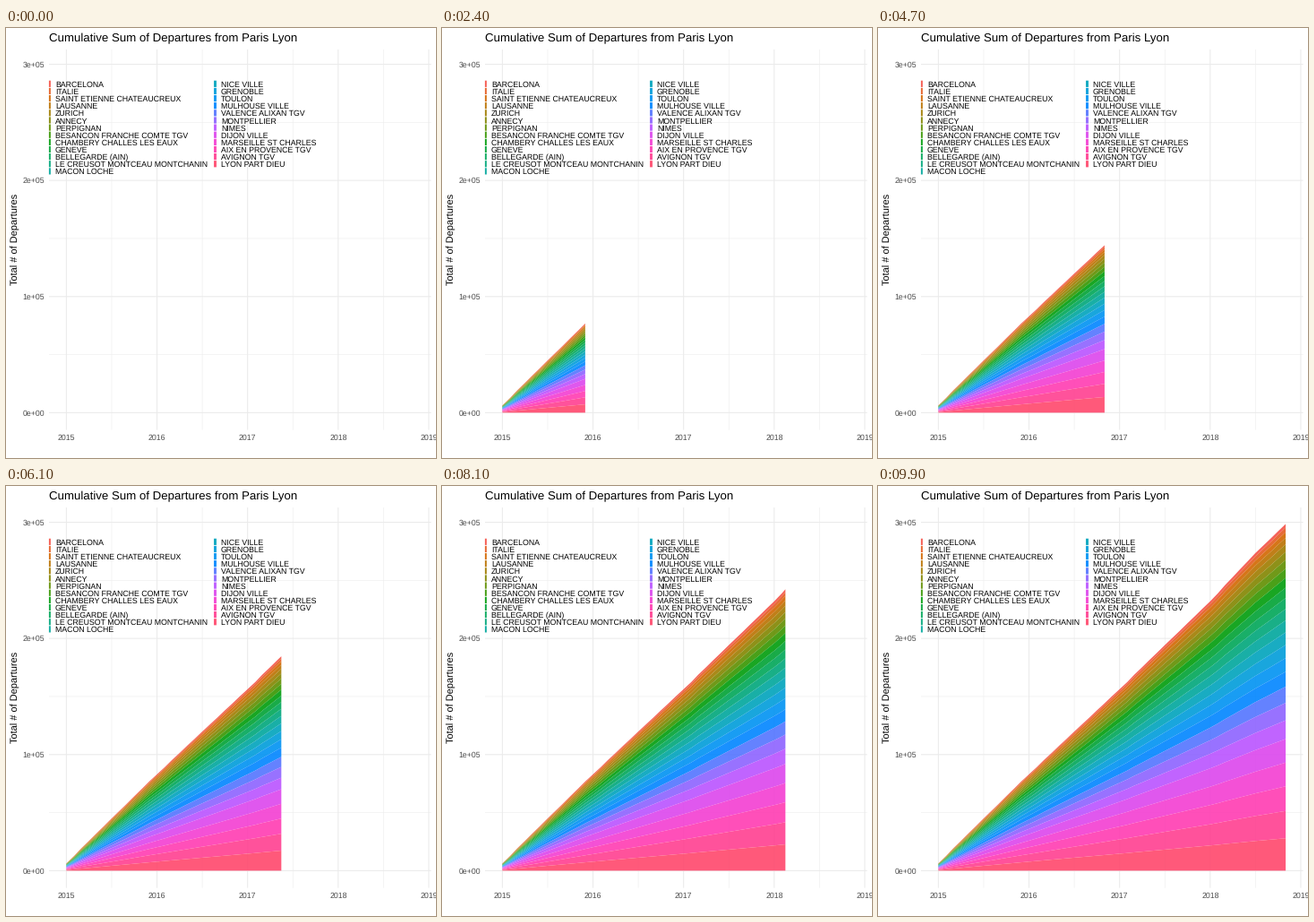
A matplotlib script for the animation above (10 s loop, 480 by 480 pixels).

```python
import matplotlib.pyplot as plt
import numpy as np
from matplotlib.animation import FuncAnimation
from matplotlib.patches import Polygon, Rectangle

plt.rcParams["font.family"] = "Liberation Sans"
plt.rcParams["text.hinting"] = "none"

SIZE, DPI, FRAMES = 480, 100, 100
LEFT, RIGHT, TOP, BOTTOM = 48, 474.5, 24, 448.6
X0, PX_PER_DAY = 67.4, 0.2769
Y0, PX_PER_K = 429.4, 1.2963
ALPHA = 0.9
ROW = 8.13

STATIONS = [
    "BARCELONA", "ITALIE", "SAINT ETIENNE CHATEAUCREUX", "LAUSANNE", "ZURICH",
    "ANNECY", "PERPIGNAN", "BESANCON FRANCHE COMTE TGV",
    "CHAMBERY CHALLES LES EAUX", "GENEVE", "BELLEGARDE (AIN)",
    "LE CREUSOT MONTCEAU MONTCHANIN", "MACON LOCHE", "NICE VILLE", "GRENOBLE",
    "TOULON", "MULHOUSE VILLE", "VALENCE ALIXAN TGV", "MONTPELLIER", "NIMES",
    "DIJON VILLE", "MARSEILLE ST CHARLES", "AIX EN PROVENCE TGV",
    "AVIGNON TGV", "LYON PART DIEU",
]
COUNT = len(STATIONS)


def hcl(hue, chroma=100, lum=65, contrast=1.5):
    """Polar LUV colour to clipped sRGB, deepened by a power curve."""
    h = np.radians(hue)
    u = chroma * np.cos(h) / (13 * lum) + 0.1978
    v = chroma * np.sin(h) / (13 * lum) + 0.4683
    y = ((lum + 16) / 116) ** 3
    xyz = np.array([y * 9 * u / (4 * v), y, y * (12 - 3 * u - 20 * v) / (4 * v)])
    to_rgb = np.array([[3.2406, -1.5372, -0.4986],
                       [-0.9689, 1.8758, 0.0415],
                       [0.0557, -0.2040, 1.0570]])
    lin = np.clip(to_rgb @ xyz, 0, 1)
    rgb = np.where(lin <= 0.0031308, 12.92 * lin,
                   1.055 * lin ** (1 / 2.4) - 0.055)
    return np.clip(rgb, 0, 1) ** contrast


rank = np.arange(COUNT)
colors = [hcl(15 + 360 * k / COUNT) for k in rank]

# Slow growth for the small stations, a jump and a cubic rise for the top five
weights = np.where(rank < 20,
                   np.interp(rank, [0, 4, 15, 19], [4, 8.4, 15.2, 20.8]),
                   26.2 + 9.8 * ((rank - 20) / 4) ** 3)
# Share of the total lying below each band edge, top edge first
shares = np.append(np.cumsum(weights[::-1])[::-1], 0) / weights.sum()

months = np.arange("2015-01", "2018-12", dtype="datetime64[M]")
days = (months.astype("datetime64[D]") - np.datetime64("2015-01-01")).astype(int)
key_frames = np.round(days / days[-1] * (FRAMES - 1))
# Cumulative total in thousands, nearly steady growth
totals = np.interp(np.arange(len(months)), [0, 11, 25, 36, 42, 46],
                   [6.2, 76.8, 162.5, 232, 273.3, 298.5])

fig = plt.figure(figsize=(SIZE / DPI, SIZE / DPI), dpi=DPI, facecolor="white")
ax = fig.add_axes([0, 0, 1, 1])
ax.set_xlim(0, SIZE)
ax.set_ylim(SIZE, 0)
ax.axis("off")


def pt(px):
    return px * 72 / DPI


def label(x, y, s, px=8.8, color="black", **kw):
    ax.text(x, y, s, fontsize=pt(px), color=color, va="baseline", zorder=5, **kw)


def grid(xs, ys, px):
    style = dict(color="#EBEBEB", lw=pt(px), zorder=1, snap=False,
                 solid_capstyle="butt")
    for x in xs:
        ax.plot([x, x], [TOP, BOTTOM], **style)
    for y in ys:
        ax.plot([LEFT, RIGHT], [y, y], **style)


def year_x(year):
    return X0 + (year - 2015) * 365.25 * PX_PER_DAY


def value_y(k):
    return Y0 - k * PX_PER_K


grid(year_x(np.arange(2015.5, 2019)), value_y(np.arange(50, 300, 100)), 0.53)
grid(year_x(np.arange(2015, 2020)), value_y(np.arange(0, 400, 100)), 1.07)

for year in range(2015, 2020):
    label(year_x(year), 460.2, str(year), color="#4D4D4D", ha="center")
for n in range(4):
    label(43, value_y(100 * n) + 3.1, f"{n}e+0{5 if n else 0}",
          color="#4D4D4D", ha="right")

label(LEFT, 15, "Cumulative Sum of Departures from Paris Lyon", 13.2)
label(13.8, 236.2, "Total # of Departures", 11, ha="center", rotation=90,
      rotation_mode="anchor")

for k, (name, color) in enumerate(zip(STATIONS, colors)):
    col, row = divmod(k, 13)
    x, w, text_x = ((47.9, 2, 55), (232, 3, 240))[col]
    y = 58.7 + ROW * row
    ax.add_patch(Rectangle((x, y), w, ROW - 0.9, fc=color, ec="none", lw=0,
                           alpha=ALPHA, zorder=4, snap=False))
    label(text_x, y + 7.1, name)

bands = [
    ax.add_patch(Polygon([(X0, Y0)] * 3, closed=True, fc=c, ec="none", lw=0,
                         alpha=ALPHA, zorder=2, snap=False))
    for c in colors
]


def draw(i):
    edge = np.interp(i, key_frames, days)
    d = np.append(days[days < edge], edge)
    x = X0 + d * PX_PER_DAY
    total = np.interp(d, days, totals)
    for band, hi, lo in zip(bands, shares, shares[1:]):
        upper = np.column_stack([x, value_y(total * hi)])
        lower = np.column_stack([x, value_y(total * lo)])
        band.set_xy(np.vstack([upper, lower[::-1]]))
        band.set_visible(i > 0)
    return bands


anim = FuncAnimation(fig, draw, frames=FRAMES, interval=100, repeat=True,
                     repeat_delay=0, init_func=lambda: draw(0))
plt.show()
```
